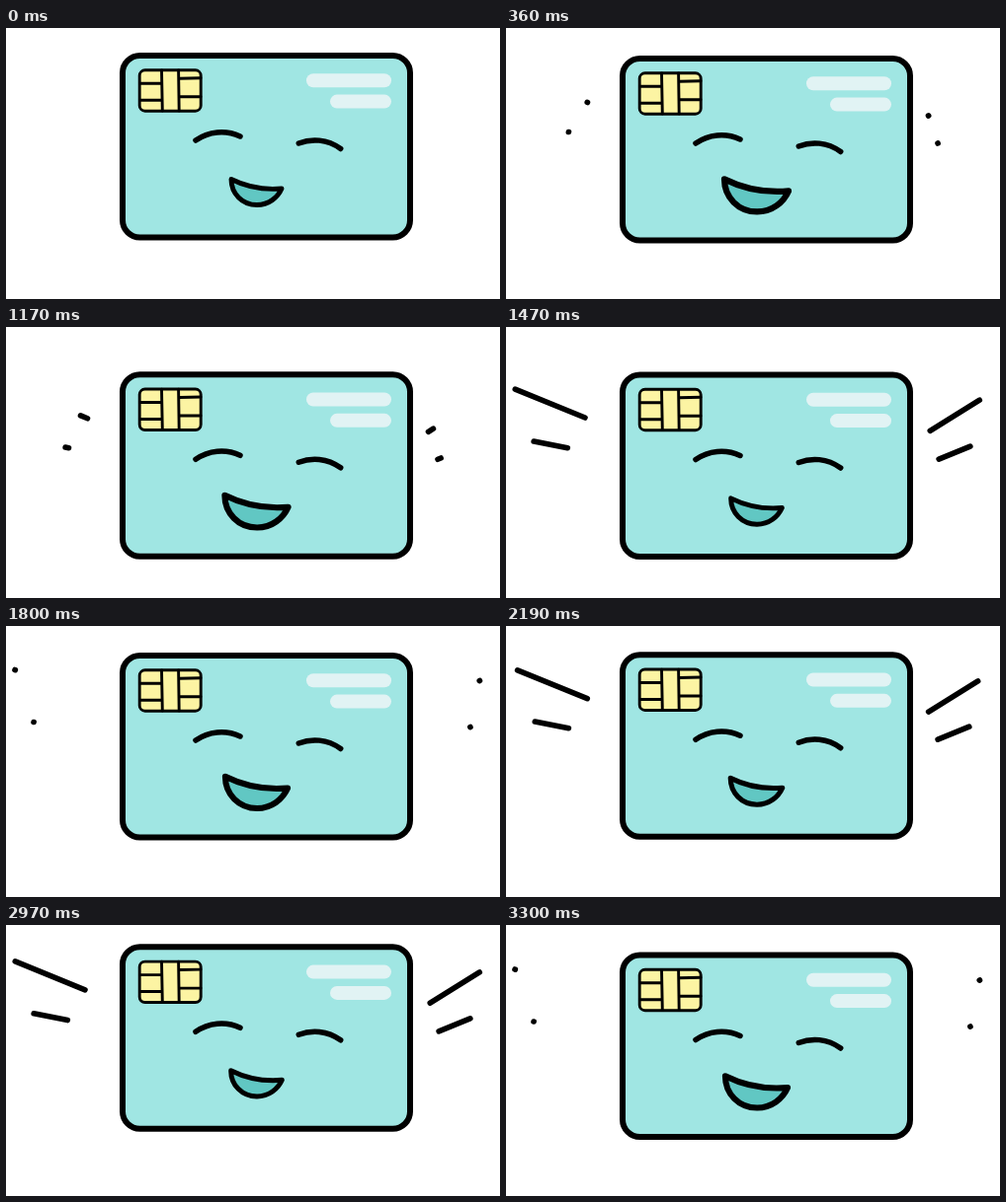
These frames come from a looping animation (500x275 px, 3.33 s). An HTML page:

```html
<!DOCTYPE html>
<html lang="en">
<head>
<meta charset="utf-8">
<title>Happy card</title>
<style>
  html, body { margin: 0; width: 100%; height: 100%; overflow: hidden; background: #fff; }
  svg { display: block; width: 500px; height: 275px; }
</style>
</head>
<body>
<svg viewBox="0 0 500 275" fill="none" stroke="#000" stroke-linecap="round" stroke-linejoin="round">
  <g id="card">
    <g id="rays" stroke-width="5.6"></g>
    <rect x="118" y="28" width="291" height="184.5" rx="17.5" fill="#a0e6e3" stroke-width="6"/>
    <g stroke="none" fill="#e1f3f4">
      <rect x="304" y="46.3" width="86" height="14" rx="7"/>
      <rect x="328" y="67.6" width="62" height="14" rx="7"/>
    </g>
    <g stroke-width="2.9">
      <rect x="135.2" y="42.8" width="62" height="41.4" rx="5.5" fill="#fcf4a3"/>
      <path d="M157.5 43L158.3 84M174.6 43L175.2 84M135.5 56.3H157.5M135.5 73.2L158 73M175 51.2L197 50.8M175 69.8H197"/>
    </g>
    <g stroke-width="5.5">
      <path d="M192 114C205 105 222 103 237 110"/>
      <path d="M296.3 117C309 112 325 112.5 338.7 122.5"/>
    </g>
    <path id="mouth" fill="#61c7c3" stroke-width="4.9"
      d="M228 153.5C244 161.5 262 164.5 279 163C275 172 266 179.5 254 179.5C239 179.5 228 168 228 153.5Z"/>
  </g>
</svg>
<script>
const LOOP = 3330, STEP = 30, BEAT = 750, RAY_START = 360;

// [time, vertical offset] of the card's drift
const drift = [
  [0, 0], [150, -2], [360, 3], [570, 2.1], [900, 6], [1080, 15.3],
  [1290, 24.4], [1470, 20.5], [1620, 12.8], [1800, 2], [1980, -3],
  [2280, 2.4], [2610, -3.5], [2700, -5], [2850, -7], [3240, 1.2], [3300, 2.5]
];

// inner x, y, outer x, y
const rays = [
  [82.5, 72.5, 9, 42.5],
  [63.5, 102.5, 28, 95.5],
  [427.5, 86, 479.5, 53.5],
  [437, 114, 470, 100.5]
];

const card = document.getElementById('card');
const mouth = document.getElementById('mouth');
const rayGroup = document.getElementById('rays');
const rayEls = rays.map(() => {
  const el = document.createElementNS('http://www.w3.org/2000/svg', 'path');
  rayGroup.appendChild(el);
  return el;
});

const clamp = v => Math.max(0, Math.min(1, v));
const smooth = v => { v = clamp(v); return v * v * (3 - 2 * v); };
const mix = (a, b, k) => a + (b - a) * k;

const slope = i => (drift[i + 1][1] - drift[i][1]) / (drift[i + 1][0] - drift[i][0]);

// Monotone tangent: flat at turning points
function tangent(i) {
  if (i === 0) return slope(0);
  if (i === drift.length - 1) return slope(i - 1);
  const a = slope(i - 1), b = slope(i);
  return a * b <= 0 ? 0 : 2 * a * b / (a + b);
}

function offsetAt(t) {
  let i = 0;
  while (i < drift.length - 2 && t > drift[i + 1][0]) i++;
  const [t0, y0] = drift[i], [t1, y1] = drift[i + 1];
  const d = t1 - t0, u = (t - t0) / d, v = 1 - u;
  return v * v * (1 + 2 * u) * y0 + u * u * (3 - 2 * u) * y1
    + d * u * v * (v * tangent(i) - u * tangent(i + 1));
}

function smileAt(t) {
  const p = (t % BEAT) / BEAT;
  const wave = (1 - Math.cos(p * 2 * Math.PI)) / 2;
  const ramp = 1 - Math.abs(1 - 2 * p);
  return 1 + 0.28 * (wave + ramp) / 2;
}

function drawRays(t) {
  const p = (t - RAY_START) % BEAT;
  const shown = t >= RAY_START && p < 705;
  rayGroup.setAttribute('visibility', shown ? 'visible' : 'hidden');
  if (!shown) return;
  const head = smooth((p + 14) / 388);
  const tail = smooth((p - 317) / 388);
  rays.forEach(([x0, y0, x1, y1], i) => {
    const at = k => mix(x0, x1, k).toFixed(2) + ' ' + mix(y0, y1, k).toFixed(2);
    rayEls[i].setAttribute('d', `M${at(tail)}L${at(head)}`);
  });
}

function draw(ms) {
  const t = Math.floor((ms % LOOP) / STEP) * STEP;
  card.setAttribute('transform', `translate(0 ${offsetAt(t).toFixed(2)})`);
  mouth.setAttribute('transform',
    `translate(253.5 165) scale(${smileAt(t).toFixed(4)}) translate(-253.5 -165)`);
  drawRays(t);
}

let start;
function tick(now) {
  if (start === undefined) start = now;
  draw(Math.max(0, now - start));
  requestAnimationFrame(tick);
}
draw(0);
requestAnimationFrame(tick);
</script>
</body>
</html>
```
